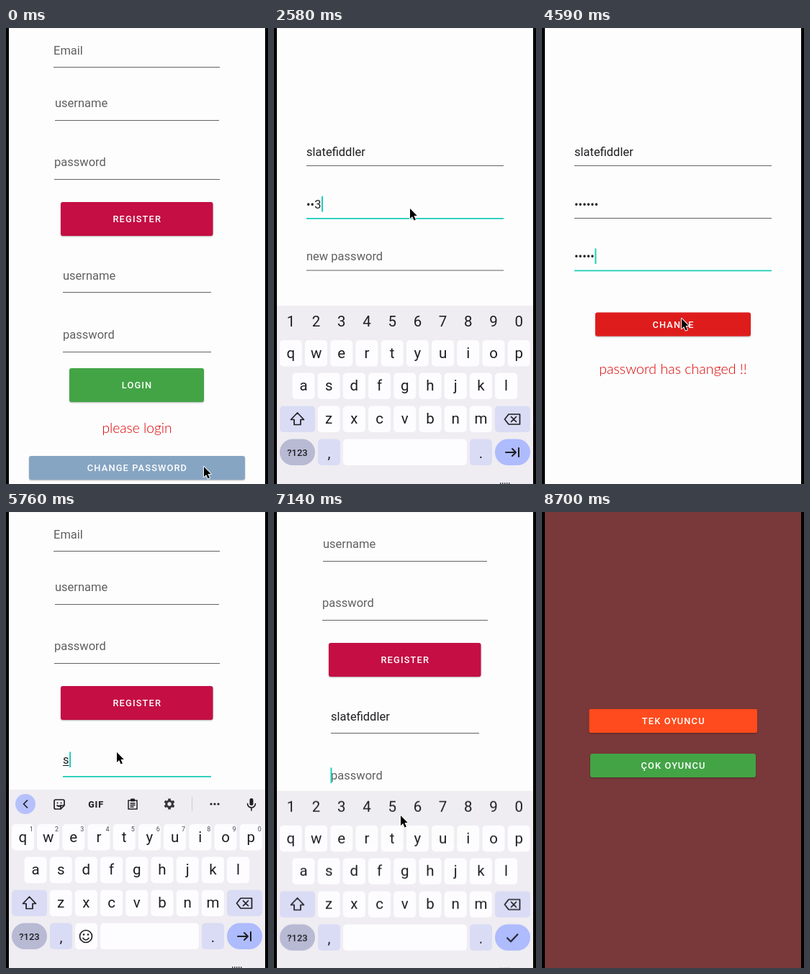
An HTML page with a canvas for the animation above (8970 ms loop, 364 px wide and 634 px high).

```html
<!DOCTYPE html>
<html lang="en">
<head>
<meta charset="utf-8">
<title>Login and password change</title>
<style>
html, body { margin: 0; width: 100%; height: 100%; overflow: hidden; background: #000; }
canvas { display: block; width: 364px; height: 634px; }
</style>
</head>
<body>
<canvas id="stage"></canvas>
<script>
const W = 364, H = 634, LOOP = 8970, STEP = 30;
const SANS = 'Roboto, "Noto Sans", sans-serif';
const HAND = '"Coming Soon", Lato, cursive, sans-serif';
const TEAL = '#1fcdba', INK = '#1e1e22', HINT = '#606060', PAPER = '#fdfdfd';
const USER = 'slatefiddler';
const dpr = window.devicePixelRatio || 1;

function surface(canvas) {
  canvas.width = W * dpr;
  canvas.height = H * dpr;
  const c = canvas.getContext('2d');
  c.scale(dpr, dpr);
  return c;
}
const stage = surface(document.getElementById('stage'));
const layer = surface(document.createElement('canvas'));
let g = stage;

const clamp = v => Math.max(0, Math.min(1, v));
const span = (t, a, b) => clamp((t - a) / (b - a));
const easeOut = p => 1 - (1 - p) * (1 - p);
const easeInOut = p => p * p * (3 - 2 * p);

// Paints on a separate layer, then lays it over the stage as one sheet.
function sheet(alpha, scale, draw) {
  if (alpha <= 0) return;
  layer.clearRect(0, 0, W, H);
  g = layer;
  draw();
  g = stage;
  g.save();
  g.globalAlpha = alpha;
  g.translate(W / 2, H / 2);
  g.scale(scale, scale);
  g.drawImage(layer.canvas, -W / 2, -H / 2, W, H);
  g.restore();
}

function rect(x, y, w, h, color) {
  g.fillStyle = color;
  g.fillRect(x, y, w, h);
}

function round(x, y, w, h, r, color) {
  g.fillStyle = color;
  g.beginPath();
  g.roundRect(x, y, w, h, r);
  g.fill();
}

function dot(x, y, r, color) {
  g.fillStyle = color;
  g.beginPath();
  g.arc(x, y, r, 0, 7);
  g.fill();
}

function pen(d, width = 1.7, color = INK) {
  g.strokeStyle = color;
  g.lineWidth = width;
  g.stroke(new Path2D(d));
}

function text(s, x, y, font, color, align = 'left', spacing = 0) {
  g.font = font;
  g.fillStyle = color;
  g.textAlign = align;
  g.letterSpacing = spacing + 'px';
  g.fillText(s, x, y);
  g.letterSpacing = '0px';
}

function button(label, x, y, w, h, color, glow = 0, r = 3) {
  g.save();
  g.shadowColor = 'rgba(0,0,0,.3)';
  g.shadowBlur = 2 * dpr;
  g.shadowOffsetY = dpr;
  round(x, y, w, h, r, color);
  g.restore();
  if (glow) round(x, y, w, h, r, `rgba(255,255,255,${glow})`);
  text(label, x + w / 2 + .5, y + h / 2 + 4.6, '500 12.83px ' + SANS, '#fff', 'center', 1.146);
}

const glow = (t, at) => .16 * Math.min(span(t, at, at + 60), 1 - span(t, at + 60, at + 210));

const note = (s, y, size) => text(s, 182, y, `300 ${size}px ${HAND}`, '#dc0000', 'center');

function field(x, right, lineY, base, hint, value = '', focus = false, composing = false, caret = focus) {
  text(value || hint, x, base, '16.5px ' + SANS, value ? INK : HINT);
  const w = value ? g.measureText(value).width : 0;
  if (composing && value) rect(x, base + 2, w, 1, INK);
  rect(x, lineY, right - x, focus ? 1.8 : 1, focus ? TEAL : '#636363');
  if (caret) rect(x + w + (w ? .6 : -.5), base - 16.5, 2, 21.5, TEAL);
}

const count = (t, start, gap, n) => Math.max(0, Math.min(n, Math.floor((t - start) / gap) + 1));
const typed = (word, t, start, gap) => word.slice(0, count(t, start, gap, word.length));

// Password text: the newest character stays readable for a moment.
function secret(word, t, start, gap) {
  const n = count(t, start, gap, word.length);
  if (!n) return '';
  const fresh = t < start + (n - 1) * gap + 240;
  return '•'.repeat(fresh ? n - 1 : n) + (fresh ? word[n - 1] : '');
}

function loginScreen(t) {
  const pan = 60 * easeOut(span(t, 7020, 7110)) * (1 - easeOut(span(t, 7710, 7800)));
  const inName = t >= 5430 && t < 6960, inPass = t >= 6960;
  rect(0, 0, W, H, PAPER);
  g.save();
  g.translate(0, -Math.round(pan));
  field(66, 297, 54, 37, 'Email');
  field(68, 296, 128, 109.5, 'username');
  field(67, 297, 210, 192, 'password');
  button('REGISTER', 76, 242, 211.5, 47, '#c40e44');
  field(79, 285, 367, 350, 'username', typed(USER, t, 5730, 66), inName, t < 6540);
  field(79, 285, 450, 432, 'password', secret('12345', t, 7230, 90), inPass);
  button('LOGIN', 88, 473, 187, 47, '#43a446', glow(t, 8310));
  note('please login', 563, 19.2);
  button('CHANGE PASSWORD', 32, 595, 300, 33, '#86a5c3', glow(t, 30));
  g.restore();
  rect(0, 0, W, 1, '#f4f4f4');
}

function changeScreen(t) {
  rect(0, 0, W, H, PAPER);
  field(45, 319, 191, 178, 'username', typed(USER, t, 990, 75), t >= 750 && t < 2160, t < 2160, t >= 900 && t < 2160);
  field(45, 319, 264, 250.5, 'current password', secret('123456', t, 2400, 90), t >= 2160 && t < 3150);
  field(45, 319, 336.5, 323, 'new password', secret('12345', t, 3270, 105), t >= 3150);
  button('CHANGE', 74, 395.5, 216, 33, '#dc0b0b', t < 4440 ? 0 : .07 * (1 - span(t, 4620, 4740)));
  note(t < 4500 ? 'sifre degistir' : 'password has changed !!', 480.5, 19.6);
  rect(0, 0, W, 1, '#f4f4f4');
}

function menuScreen() {
  rect(0, 0, W, H, '#793839');
  button('TEK OYUNCU', 65.5, 274, 233.5, 33, '#ff4b1d', 0, 2);
  button('ÇOK OYUNCU', 67, 336, 230, 33, '#43a446');
}

// Keyboard visits: when it starts to rise and when it starts to sink.
const VISITS = [[810, 3900], [5460, 6570], [7030, 7680]], SLIDE = 120;

function keyboardShown(t) {
  const visit = VISITS.find(([up, down]) => t > up && t < down + SLIDE);
  if (!visit) return 0;
  const [up, down] = visit;
  return easeOut(span(t, up, up + SLIDE)) * (1 - span(t, down, down + SLIDE) ** 2);
}

function toolbar() {
  dot(27, 406, 14, '#b6c1fc');
  pen('M29.5 401l-5 5 5 5');
  pen('M69 400h10a2 2 0 0 1 2 2v6l-5 5h-7a2 2 0 0 1-2-2v-9a2 2 0 0 1 2-2zM81 408h-5v5M71 408q2.500 2 5 0');
  dot(71.5, 404.5, 1, INK);
  dot(76.5, 404.5, 1, INK);
  text('GIF', 125, 411, '900 12.5px ' + SANS, '#2c2c32', 'center', .8);
  pen('M170 401h12v12h-12zM173 405h6M173 407.500h6M173 410h4', 1.5);
  round(173, 398.5, 6, 4, 1, INK);
  g.save();
  g.translate(227, 406);
  for (let i = 0; i < 6; i++) {
    rect(-1.8, -7.5, 3.6, 4, '#34343a');
    g.rotate(Math.PI / 3);
  }
  g.strokeStyle = '#34343a';
  g.lineWidth = 3;
  g.beginPath();
  g.arc(0, 0, 4.2, 0, 7);
  g.stroke();
  g.restore();
  rect(258, 396, 1, 20, '#cfcdd5');
  for (let i = -1; i < 2; i++) dot(290 + i * 5, 406, 1.6, INK);
  round(338.5, 398, 5, 10, 2.5, INK);
  pen('M335.500 405.500a5.500 5.500 0 0 0 11 0M341 411v4', 1.6);
}

function keyboard(t) {
  const digits = (t >= 2160 && t < 4060) || t >= 6960;
  const last = (t >= 3150 && t < 4060) || t >= 6960;
  const face = '20.5px ' + SANS, tint = '#dadcf5', white = '#fdfcfe';
  const spot = i => 23.4 + i * 35.2;
  const key = (x, y, w, color, r = 5) => round(x, y, w, 36.5, r, color);
  const letters = (row, x0, y, hints) => [...row].forEach((ch, i) => {
    const x = x0 + i * 35.2;
    key(x - 15.5, y - 18, 31, white);
    text(ch, x, y + 6.5, face, INK, 'center');
    if (hints) text((i + 1) % 10, x + 12, y - 8, '9px ' + SANS, '#4a4a50', 'center');
  });

  g.lineCap = g.lineJoin = 'round';
  rect(0, 386, W, H, '#efedf2');
  if (digits) for (let i = 0; i < 10; i++) text((i + 1) % 10, spot(i), 415, face, INK, 'center');
  else toolbar();
  letters('qwertyuiop', spot(0), 452, !digits);
  letters('asdfghjkl', spot(.5), 497.5);
  letters('zxcvbnm', spot(1.5), 543.5);

  key(8, 525.5, 49, tint);
  pen('M32.500 535l9 9.500h-4.500v7h-9v-7h-4.500z');
  key(307, 525.5, 49, tint);
  pen('M326 537h15.500v14h-15.500l-5.500-7zM329.500 540.500l7 7M336.500 540.500l-7 7');

  key(8, 571.5, 49, '#b8bad4', 18);
  text('?123', 32.5, 595, '500 13px ' + SANS, INK, 'center');
  key(61, 571.5, 31, tint);
  text(',', 76.5, 598, face, INK, 'center');
  if (digits) {
    key(96, 571.5, 172, white);
  } else {
    key(96, 571.5, 31, white);
    key(131, 571.5, 137, white);
    pen('M102.500 590a8.500 8.500 0 1 0 17 0a8.500 8.500 0 1 0-17 0M107 592.500q4 5 8 0');
    dot(108, 587.5, 1.3, INK);
    dot(114, 587.5, 1.3, INK);
  }
  key(272, 571.5, 31, tint);
  text('.', 287.5, 598, face, INK, 'center');
  key(307, 571.5, 49, '#aebbfd', 18);
  pen(last ? 'M324 590.500l5 5 9.500-10' : 'M322 590h14M331 585l5 5-5 5M340 584v12', 2);
  for (let i = 0; i < 5; i++) rect(314 + i * 3, 632, 1.5, 2, '#55555c');
}

// Pointer stops: time, x, y.
const POINTER = [
  [210, 275, 610], [720, 180, 176], [1950, 180, 176], [2130, 189, 251],
  [2940, 189, 251], [3120, 192, 318], [4020, 192, 318], [4380, 194, 404],
  [4830, 194, 404], [5400, 154, 334], [6600, 154, 334], [6930, 176, 422],
  [7800, 176, 422], [8250, 188, 492]
];

function pointer(t) {
  if (t >= 8670) return;
  let i = POINTER.findIndex(p => p[0] > t);
  if (i < 0) i = POINTER.length - 1;
  const b = POINTER[i], a = POINTER[i - 1] || b;
  const p = a === b ? 1 : easeInOut(span(t, a[0], b[0]));
  g.save();
  g.translate(a[1] + (b[1] - a[1]) * p, a[2] + (b[2] - a[2]) * p);
  g.scale(.93, .93);
  const arrow = new Path2D('M0 0v15l3.400-3.200 2.600 6 2.500-1.100-2.600-5.900h4.600z');
  g.lineJoin = 'round';
  g.lineWidth = 2;
  g.strokeStyle = '#fff';
  g.stroke(arrow);
  g.fillStyle = '#000';
  g.fill(arrow);
  g.restore();
}

const TURN = 180;

// The new screen fades in at once and grows to full size.
function forward(t, at, from, to) {
  const p = easeOut(span(t, at, at + TURN));
  sheet(1, 1, () => from(t));
  sheet(span(t, at, at + 60), .85 + .15 * p, () => to(t));
}

// The old screen fades off while the one below settles.
function back(t, at, from, to) {
  const p = easeOut(span(t, at, at + TURN));
  sheet(1, 1.1 - .1 * p, () => to(t));
  sheet(1 - span(t, at, at + 60), 1 - .15 * p, () => from(t));
}

function paint(t) {
  g = stage;
  rect(0, 0, W, H, '#000');
  g.save();
  g.beginPath();
  g.rect(4, 0, 356, H);
  g.clip();
  if (t < 120) loginScreen(t);
  else if (t < 120 + TURN) forward(t, 120, loginScreen, changeScreen);
  else if (t < 4770) changeScreen(t);
  else if (t < 4770 + TURN) back(t, 4770, changeScreen, loginScreen);
  else if (t < 8490) loginScreen(t);
  else if (t < 8490 + TURN) forward(t, 8490, loginScreen, menuScreen);
  else menuScreen();

  const shown = keyboardShown(t);
  if (shown > 0) {
    const drop = 248 * (1 - shown);
    g.translate(0, drop);
    sheet(Math.sqrt(shown), 1, () => keyboard(t));
    g.translate(0, -drop);
  }
  pointer(t);
  g.restore();
}

const start = performance.now();
function tick() {
  const t = (performance.now() - start) % LOOP;
  paint(Math.floor(t / STEP) * STEP);
  requestAnimationFrame(tick);
}
tick();
</script>
</body>
</html>
```
